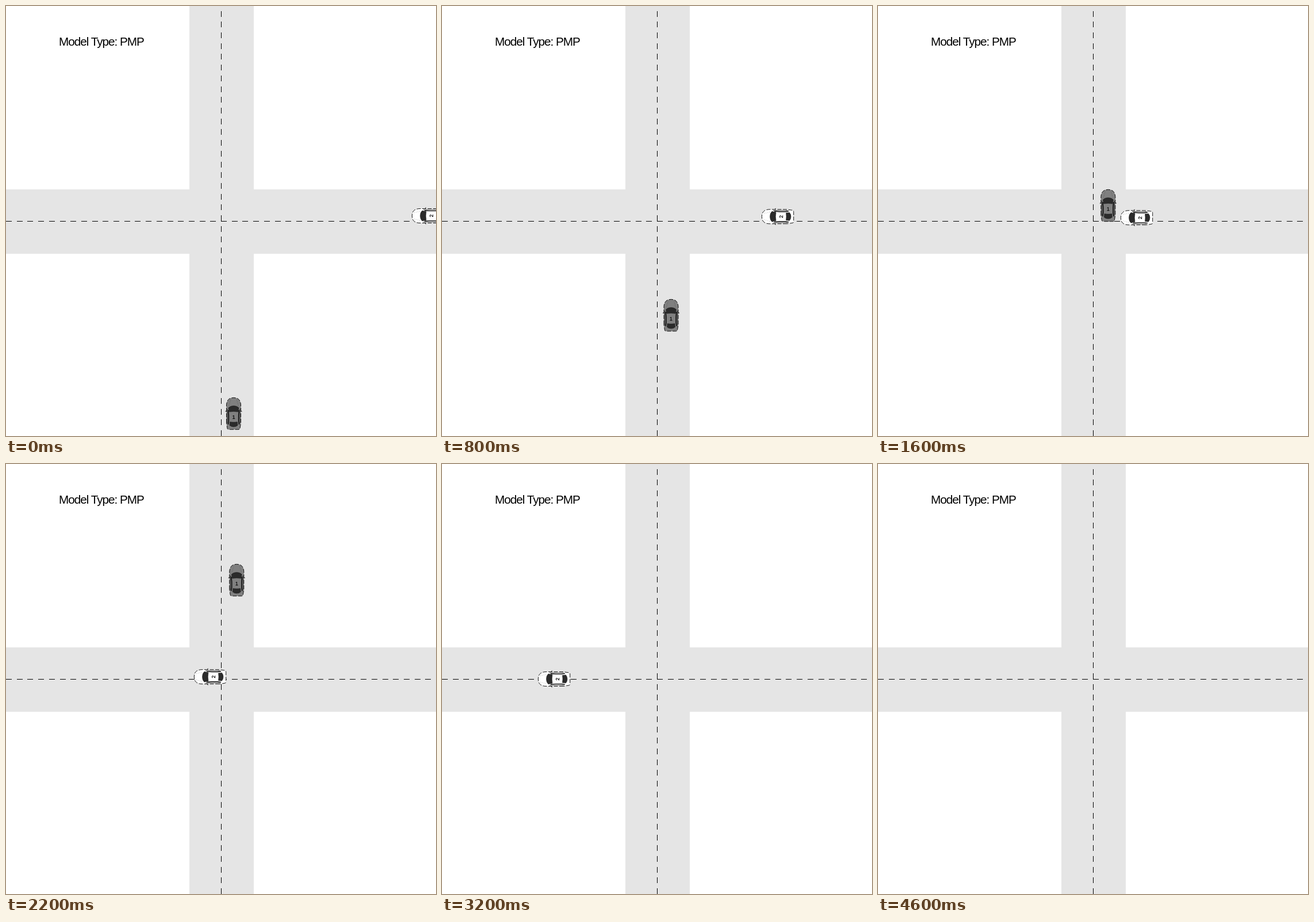
An HTML page for the animation above (5800 ms loop, 748x748 px).

```html
<!DOCTYPE html>
<html lang="en">
<head>
<meta charset="utf-8">
<title>Intersection</title>
<style>
  html, body { margin: 0; width: 100%; height: 100%; overflow: hidden; background: #fff; }
  svg { display: block; width: 100vw; height: 100vh; }
  text { font-family: "Liberation Sans", Arial, sans-serif; }
  .title { font-size: 20.7px; letter-spacing: -1px; }
  .label { font-size: 8.5px; text-anchor: middle; stroke: #000; stroke-width: .25; }
  .lane { stroke: #000; stroke-dasharray: 10 8.7; shape-rendering: crispEdges; }
  .glass { fill: #2b2b2b; stroke: #111; stroke-width: .5; }
  .line { fill: none; stroke: #000; }
</style>
</head>
<body>
<svg viewBox="0 0 748 748">
  <defs>
    <path id="body" d="M-12.5 -14C-12.5 -23 -8 -27.7 0 -27.7S12.5 -23 12.5 -14V16L11 26Q10.5 27.7 8 27.7H-8Q-10.5 27.7 -11 26L-12.5 16Z"/>
    <g id="trim">
      <path class="line" stroke-width=".9" stroke-dasharray="7 2.5"
        d="M-12.5 16V-14C-12.5 -23 -8 -27.7 0 -27.7S12.5 -23 12.5 -14V16L11 26Q10.5 27.7 8 27.7H-8Q-10.5 27.7 -11 26L-12.5 16"/>
      <path class="line" stroke-width="1" d="M-12.5 -4.5L-14.5 -3.8M12.5 -4.5L14.5 -3.8"/>
      <path class="line" stroke-width=".5" stroke-dasharray="1 2" opacity=".6" d="M-8 -14L-5 -25M8 -14L5 -25"/>
      <path class="line" stroke-width="1.4" d="M-9.3 -6L-8.6 3V13L-9.6 19M9.3 -6L8.6 3V13L9.6 19"/>
      <path class="line" stroke-width=".7" d="M-10.8 -8V17M10.8 -8V17"/>
      <path class="glass" d="M-9 -10Q-6 -13.5 0 -13.5T9 -10L7.5 -3Q0 -4.5 -7.5 -3Z"/>
      <path class="glass" d="M-6.5 14.5Q0 15.5 6.5 14.5L7 20.5Q4 23 0 23T-7 20.5Z"/>
    </g>
  </defs>
  <path fill="#e5e5e5" d="M319 0H431V319H748V431H431V748H319V431H0V319H319Z"/>
  <path class="lane" d="M0 374.5H748"/>
  <path class="lane" d="M374.5 748V0"/>
  <text class="title" x="92" y="69">Model Type: PMP</text>
  <g id="car1">
    <use href="#body" fill="#808080"/><use href="#trim"/>
    <text class="label" y="8.5">1</text>
  </g>
  <g id="car2">
    <use href="#body" fill="#fff"/><use href="#trim"/>
    <text class="label" y="9">2</text>
  </g>
</svg>
<script>
const LOOP = 5800, STEP = 200, LAST = 23, HALF = 28;
const car1 = document.getElementById("car1");
const car2 = document.getElementById("car2");

// Front bumper positions: each car changes its acceleration at step 8.
function front1(n) {
  const m = n - 8;
  return m < 0
    ? 681 - n * (38.92 + 1.125 * n - 0.0417 * n * n)
    : 319 - m * (49.16 - 0.277 * m);
}

function front2(n) {
  const m = n - 8;
  return m < 0
    ? 706 - n * (39.5 - 0.5 * n)
    : 422 - m * (31.5 + 0.045 * m);
}

function place(car, x, y, angle) {
  car.setAttribute("transform", `translate(${x} ${y}) rotate(${angle})`);
}

function draw(time) {
  const n = Math.min(LAST, Math.floor((time % LOOP) / STEP));
  place(car1, 396 + 0.7 * n - 0.02 * n * n, Math.round(front1(n)) + HALF, 0);
  place(car2, Math.round(front2(n)) + HALF, 365 + 0.26 * n + 0.019 * n * n, -90);
}

const start = performance.now();
function tick() {
  draw(performance.now() - start);
  requestAnimationFrame(tick);
}
tick();
</script>
</body>
</html>
```
